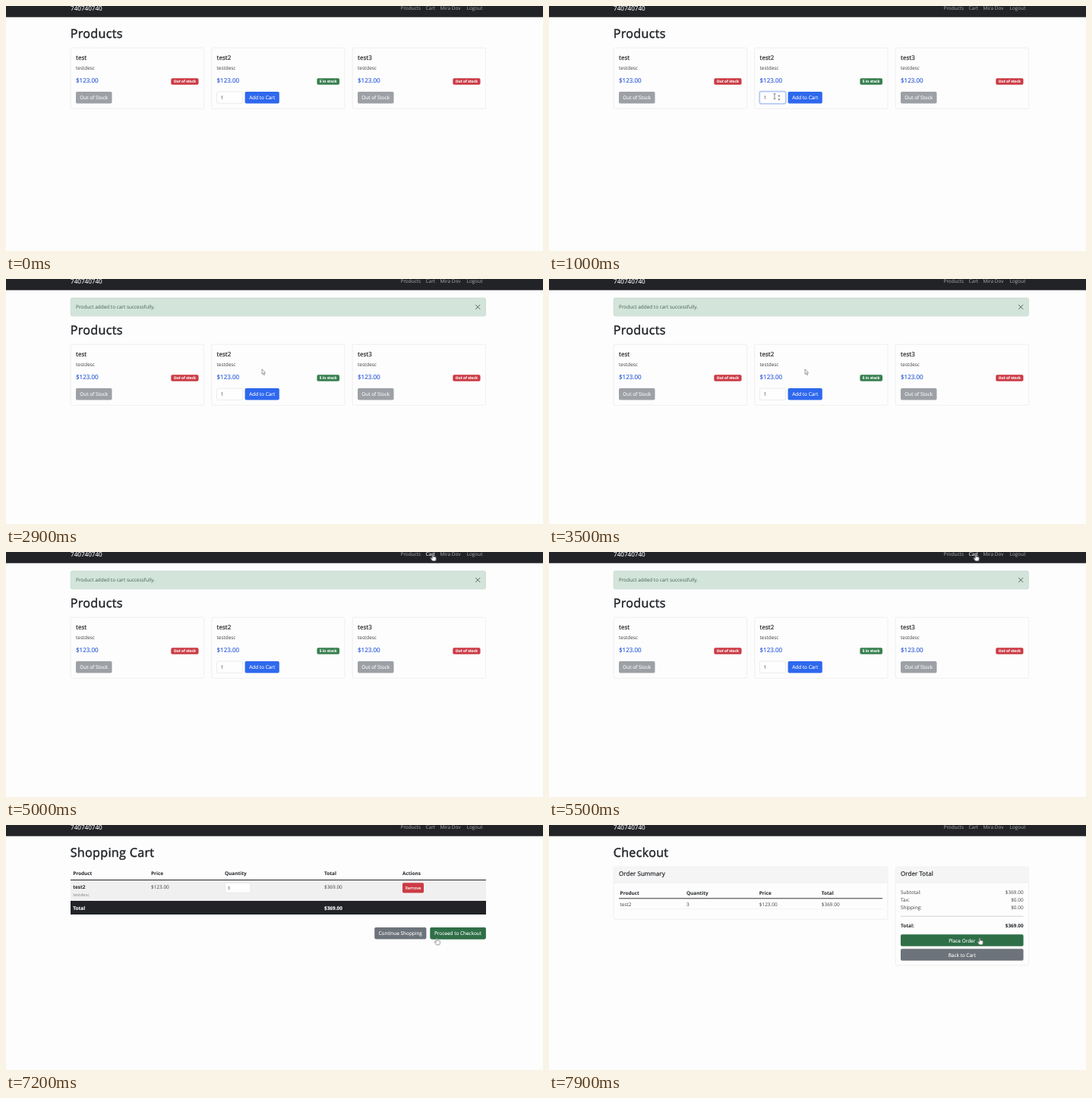
Write an HTML page that moves like this. It is 707x323 px and loops after 8 s.

```html
<!DOCTYPE html>
<html lang="en">
<head>
<meta charset="utf-8">
<title>Shop checkout</title>
<style>
html, body { margin: 0; width: 100%; height: 100%; overflow: hidden; background: #fdfdfd; }
svg { display: block; width: 707px; height: 323px; }
text { font: 400 6.45px "Open Sans", "Noto Sans", sans-serif; fill: #3c3e42; text-rendering: geometricPrecision; }
/* a thin outline gives the medium weight */
.h1 { font-size: 16.1px; letter-spacing: .32px; fill: #1f2226; stroke: #1f2226; stroke-width: .45; }
.h5 { font-size: 8px; letter-spacing: .06px; fill: #212428; stroke: #212428; stroke-width: .2; }
.price { font-size: 8px; fill: #3562dc; stroke: #3562dc; stroke-width: .2; }
.brand { font-size: 8.1px; }
.small { font-size: 5.6px; }
.muted { fill: #808286; }
.bold { font-weight: 700; fill: #212428; }
.tag { font-size: 4.8px; font-weight: 700; }
.mid { text-anchor: middle; }
.end { text-anchor: end; }
.white { fill: #fdfdfd; stroke: #fdfdfd; stroke-width: .1; }
.nav { fill: #adaeb0; }
.lit { fill: #d6d7d8; }
.note { fill: #456052; }
.box { fill: #fdfdfd; stroke: #e4e4e5; stroke-width: .6; }
.field { fill: #fefefe; stroke: #dcdee1; stroke-width: .6; }
.dark { fill: #212327; }
.red { fill: #cc3b45; }
.green { fill: #38804f; }
.deep { fill: #2f6f47; }
.blue { fill: #2e68ee; }
.navy { fill: #2859cc; }
.grey { fill: #6d737b; }
.off { fill: #9da1a6; }

/* hard page and state changes */
.cut { animation: 8s step-end infinite; }
#shop { animation-name: shop; }
#cart { animation-name: cart; }
#checkout { animation-name: checkout; }
#drop { animation-name: drop; }
#alert { animation-name: alert; }
#focus { animation-name: focus; }
#select { animation-name: select; }
#one { animation-name: one; }
#three { animation-name: three; }
#addHover { animation-name: addHover; }
#linkHover { animation-name: linkHover; }
#payHover { animation-name: payHover; }
#arrow { animation-name: arrow; }
#hand { animation-name: hand; }
#beam { animation-name: beam; }
@keyframes shop { 0% { opacity: 1 } 70%, 100% { opacity: 0 } }
@keyframes cart { 0% { opacity: 0 } 70% { opacity: 1 } 93.75%, 100% { opacity: 0 } }
@keyframes checkout { 0% { opacity: 0 } 93.75%, 100% { opacity: 1 } }
@keyframes drop { 0% { transform: none } 36.25%, 100% { transform: translateY(31px) } }
@keyframes alert { 0% { opacity: 0 } 36.25%, 100% { opacity: 1 } }
@keyframes focus { 0% { opacity: 0 } 12.5% { opacity: 1 } 35%, 100% { opacity: 0 } }
@keyframes select { 0% { opacity: 0 } 18.75% { opacity: 1 } 28.75%, 100% { opacity: 0 } }
@keyframes one { 0% { opacity: 1 } 28.75% { opacity: 0 } 36.25%, 100% { opacity: 1 } }
@keyframes three { 0% { opacity: 0 } 28.75% { opacity: 1 } 36.25%, 100% { opacity: 0 } }
@keyframes addHover { 0% { opacity: 0 } 33% { opacity: 1 } 36.25%, 100% { opacity: 0 } }
@keyframes linkHover { 0% { opacity: 0 } 59% { opacity: 1 } 71.5%, 100% { opacity: 0 } }
@keyframes payHover { 0% { opacity: 0 } 85%, 100% { opacity: 1 } }
@keyframes arrow {
  0% { opacity: 1 } 10% { opacity: 0 } 22.5% { opacity: 1 } 33% { opacity: 0 }
  36.25% { opacity: 1 } 59% { opacity: 0 } 71.5% { opacity: 1 } 85%, 100% { opacity: 0 }
}
@keyframes hand {
  0% { opacity: 0 } 33% { opacity: 1 } 36.25% { opacity: 0 }
  59% { opacity: 1 } 71.5% { opacity: 0 } 85%, 100% { opacity: 1 }
}
@keyframes beam { 0% { opacity: 0 } 10% { opacity: 1 } 22.5%, 100% { opacity: 0 } }

#pointer { animation: travel 8s ease-in-out infinite; }
@keyframes travel {
  0%, 1.25% { transform: translate(430px, -14px) }
  11.25%, 14% { transform: translate(297px, 119px) }
  20%, 26.5% { transform: translate(277px, 121px) }
  30% { transform: translate(300px, 166px) }
  34%, 45.5% { transform: translate(337px, 118.8px) }
  60%, 70.5% { transform: translate(562.5px, 2.8px) }
  77%, 78% { transform: translate(529.5px, 46.2px) }
  87.5%, 100% { transform: translate(567.6px, 148.8px) }
}
</style>
</head>
<body>
<svg viewBox="0 0 707 323">
  <defs>
    <g id="card">
      <rect class="box" x=".2" y="55.2" width="175.4" height="80.2" rx="2"/>
      <text x="7" y="83.5">testdesc</text>
      <text class="price" x="7" y="101.1">$123.00</text>
    </g>
    <g id="soldOut">
      <use href="#card"/>
      <rect class="red" x="132.3" y="95.2" width="36.2" height="8.6" rx="1.8"/>
      <text class="tag mid white" x="150.4" y="101.2">Out of stock</text>
      <rect class="off" x="7" y="112.9" width="47.5" height="15.6" rx="1.8"/>
      <text class="mid white" x="30.7" y="123.2">Out of Stock</text>
    </g>
  </defs>

  <rect width="707" height="323" fill="#fdfdfd"/>

  <g id="shop" class="cut">
    <g id="alert" class="cut">
      <rect x="85.2" y="25" width="546.3" height="23.8" rx="2" fill="#d3e4db" stroke="#bdd5c8" stroke-width=".6"/>
      <text class="note" x="92" y="39.4">Product added to cart successfully.</text>
      <path d="M618.2 33.9l6 6m0-6l-6 6" stroke="#58645e" stroke-width="1"/>
    </g>
    <g id="drop" class="cut">
      <text class="h1" x="84.7" y="41.7">Products</text>
      <use href="#soldOut" x="85"/>
      <use href="#card" x="270.5"/>
      <use href="#soldOut" x="456"/>
      <text class="h5" x="92" y="70.7">test</text>
      <text class="h5" x="277.5" y="70.7">test2</text>
      <text class="h5" x="463" y="70.7">test3</text>
      <rect class="green" x="409.4" y="95.2" width="29.6" height="8.6" rx="1.8"/>
      <text class="tag mid white" x="424.2" y="101.2">5 in stock</text>

      <rect class="field" x="277.6" y="113" width="33.8" height="15.4" rx="2"/>
      <g id="focus" class="cut">
        <rect x="277.2" y="112.6" width="34.6" height="16.2" rx="2.2" fill="none" stroke="#b5caf6" stroke-width="1.8"/>
        <path d="M301.2 119.2l1.7-2 1.7 2zM301.2 122.6l1.7 2 1.7-2z" fill="#6c6e72"/>
      </g>
      <text id="one" class="cut" x="282.7" y="123.2">1</text>
      <text id="three" class="cut" x="282.7" y="123.2">3</text>
      <g id="select" class="cut">
        <rect x="282.5" y="115.6" width="4.4" height="10.2" fill="#2b5fc9"/>
        <text class="white" x="282.7" y="123.2">1</text>
      </g>

      <rect class="blue" x="314.6" y="112.9" width="45.2" height="15.6" rx="1.8"/>
      <rect id="addHover" class="cut navy" x="314.6" y="112.9" width="45.2" height="15.6" rx="1.8"/>
      <text class="mid white" x="337.2" y="123.2">Add to Cart</text>
    </g>
  </g>

  <g id="cart" class="cut">
    <text class="h1" x="84.7" y="41.7">Shopping Cart</text>
    <text class="bold" x="88.2" y="66.3">Product</text>
    <text class="bold" x="191" y="66.3">Price</text>
    <text class="bold" x="288" y="66.3">Quantity</text>
    <text class="bold" x="419" y="66.3">Total</text>
    <text class="bold" x="522" y="66.3">Actions</text>
    <rect x="85" y="72" width="547" height="28" fill="#f1f0f1"/>
    <rect class="dark" x="85" y="72" width="547" height="1"/>
    <text class="bold" x="88.2" y="84.2">test2</text>
    <text class="small muted" x="88.2" y="94.1">testdesc</text>
    <text x="191" y="84.2">$123.00</text>
    <rect class="field" x="288.2" y="76.3" width="33.6" height="13.2" rx="1.8"/>
    <text class="small" x="291.7" y="85.1">3</text>
    <text x="419" y="84.2">$369.00</text>
    <rect class="red" x="522" y="76.2" width="28" height="13.2" rx="1.6"/>
    <text class="small mid white" x="536" y="85">Remove</text>
    <rect class="dark" x="85" y="100" width="547" height="18"/>
    <text class="bold white" x="88.2" y="111.7">Total</text>
    <text class="bold white" x="419" y="111.7">$369.00</text>
    <rect class="grey" x="485.2" y="135" width="68.2" height="15.4" rx="1.8"/>
    <text class="mid white" x="519.2" y="145.2">Continue Shopping</text>
    <rect class="green" x="558.5" y="135" width="73.2" height="15.4" rx="1.8"/>
    <rect id="payHover" class="cut deep" x="558.5" y="135" width="73.2" height="15.4" rx="1.8"/>
    <text class="mid white" x="595" y="145.2">Proceed to Checkout</text>
  </g>

  <g id="checkout" class="cut">
    <text class="h1" x="84.7" y="41.7">Checkout</text>
    <rect class="box" x="85.2" y="55.2" width="360.8" height="69.2" rx="2"/>
    <path d="M85.5 75.8V57q0-1.5 1.5-1.5h357q1.7 0 1.7 1.5v18.8z" fill="#f5f5f5"/>
    <path d="M85 76h361" stroke="#e2e2e3" stroke-width=".6"/>
    <text class="h5" x="92" y="67.4">Order Summary</text>
    <text class="bold" x="93.6" y="92.2">Product</text>
    <text class="bold" x="181" y="92.2">Quantity</text>
    <text class="bold" x="276.8" y="92.2">Price</text>
    <text class="bold" x="358.8" y="92.2">Total</text>
    <rect x="92" y="96.3" width="347" height="1" fill="#35373b"/>
    <text x="93.6" y="106.5">test2</text>
    <text x="181" y="106.5">3</text>
    <text x="276.8" y="106.5">$123.00</text>
    <text x="358.8" y="106.5">$369.00</text>
    <path d="M92 110.8h347" stroke="#e8e8e9" stroke-width=".6"/>

    <rect class="box" x="456.2" y="55.2" width="175.4" height="129.8" rx="2"/>
    <path d="M456.5 75.8V57q0-1.5 1.5-1.5h171.6q1.7 0 1.7 1.5v18.8z" fill="#f5f5f5"/>
    <path d="M456 76h175.6" stroke="#e2e2e3" stroke-width=".6"/>
    <text class="h5" x="463" y="67.4">Order Total</text>
    <text x="463" y="90.5">Subtotal:</text><text class="end" x="624.6" y="90.5">$369.00</text>
    <text x="463" y="100.6">Tax:</text><text class="end" x="624.6" y="100.6">$0.00</text>
    <text x="463" y="110.7">Shipping:</text><text class="end" x="624.6" y="110.7">$0.00</text>
    <path d="M463 120.3h161.6" stroke="#bfc0c1" stroke-width=".7"/>
    <text class="bold" x="463" y="135">Total:</text><text class="bold end" x="624.6" y="135">$369.00</text>
    <rect class="deep" x="463" y="144.2" width="161.6" height="15.6" rx="1.8"/>
    <text class="mid white" x="543.8" y="154.5">Place Order</text>
    <rect class="grey" x="463" y="163.2" width="161.6" height="15.6" rx="1.8"/>
    <text class="mid white" x="543.8" y="173.5">Back to Cart</text>
  </g>

  <rect class="dark" width="707" height="14.7"/>
  <text class="brand white" x="85" y="5.8">740740740</text>
  <text class="nav" x="519.5" y="5">Products</text>
  <text class="nav" x="552.5" y="5">Cart</text>
  <text id="linkHover" class="cut lit" x="552.5" y="5">Cart</text>
  <text class="nav" x="571.5" y="5">Mira Dov</text>
  <text class="nav" x="606.6" y="5.4">Logout</text>

  <g id="pointer" stroke-linejoin="round">
    <path id="arrow" class="cut" d="M0 0v6.6l1.5-1.3 1.1 2.5 1.1-.5-1.1-2.4h2z" fill="#fff" stroke="#5a5a5c" stroke-width=".6"/>
    <path id="hand" class="cut" d="M-1.2.8Q-1.2 0-.5 0T.2.8v2.6q.8-.5 1.3.2.8-.5 1.3.2 1-.2 1 .8v2q0 1.4-.8 2.4H-1.1L-3.3 5.7q-.4-.9.4-1.1.6-.1 1.7 1.1z" fill="#fff" stroke="#4a4a4c" stroke-width=".6"/>
    <path id="beam" class="cut" d="M-1.5-3.2h3M0-3.2v6.6M-1.5 3.4h3" fill="none" stroke="#55575b" stroke-width=".7"/>
  </g>
</svg>
</body>
</html>
```
